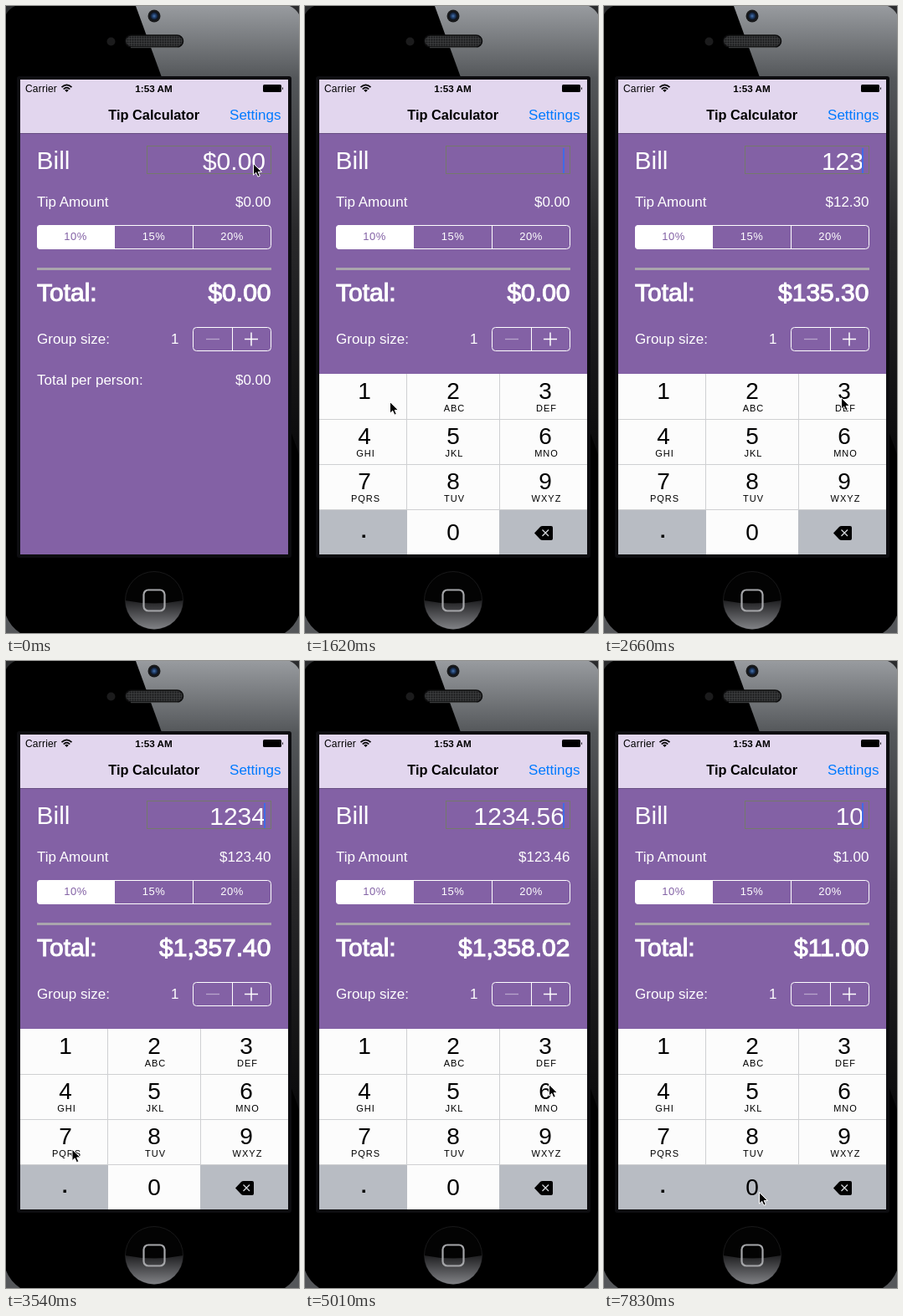
These frames come from a looping animation (350 px wide and 750 px high, 8 s). An HTML page:

```html
<!DOCTYPE html>
<html lang="en">
<head>
<meta charset="utf-8">
<title>Tip Calculator</title>
<style>
html, body { margin: 0; width: 100%; height: 100%; overflow: hidden; background: #000; }
svg { display: block; width: 350px; height: 750px; font-family: "Liberation Sans", Arial, sans-serif; }
.w { fill: #fff; }
.body { font-size: 17px; }
.big { font-size: 30px; }
.medium { stroke: #fff; stroke-width: 1.1px; }
.mid { text-anchor: middle; }
.end { text-anchor: end; }
.outline { fill: none; stroke: #fff; }
.seg { font-size: 13px; letter-spacing: .5px; text-anchor: middle; }
.digit { font-size: 28px; text-anchor: middle; }
.abc { font-size: 11px; letter-spacing: 1px; text-anchor: middle; }
</style>
</head>
<body>
<svg viewBox="0 0 350 750">
  <defs>
    <linearGradient id="gloss" gradientUnits="userSpaceOnUse" x1="0" y1="0" x2="0" y2="536">
      <stop offset="0" stop-color="#989b9f"/>
      <stop offset=".16" stop-color="#54575a"/>
      <stop offset=".5" stop-color="#29292b"/>
      <stop offset="1" stop-color="#0a0a0b"/>
    </linearGradient>
    <linearGradient id="shine" x1="0" y1="0" x2="0" y2="1">
      <stop offset="0" stop-color="#202022"/>
      <stop offset="1" stop-color="#85868a"/>
    </linearGradient>
    <radialGradient id="lens">
      <stop offset="0" stop-color="#4a76b0"/>
      <stop offset=".45" stop-color="#22406c"/>
      <stop offset="1" stop-color="#0b0f18"/>
    </radialGradient>
    <pattern id="mesh" width="3" height="3" patternUnits="userSpaceOnUse">
      <rect width="3" height="3" fill="#38393b"/>
      <circle cx="1.5" cy="1.5" r="1" fill="#161617"/>
    </pattern>
    <clipPath id="screen"><rect x="17" y="88" width="320" height="568"/></clipPath>
    <clipPath id="home"><circle cx="177" cy="711" r="34.5"/></clipPath>
  </defs>

  <!-- phone -->
  <rect width="350" height="750"/>
  <path d="M155 0H350V536Z" fill="url(#gloss)"/>
  <path d="M0 10Q4 3 11 0H0ZM350 10Q346 3 339 0H350Z" fill="#2b2c2e"/>
  <path d="M0 729Q5 742 17 750H0ZM350 729Q345 742 333 750H350Z" fill="#55575a"/>
  <circle cx="177" cy="12" r="7.5" fill="#17181a"/>
  <circle cx="177" cy="12" r="5" fill="url(#lens)"/>
  <circle cx="125.500" cy="42.500" r="5" fill="#1b1b1c"/>
  <rect x="142.500" y="35" width="69" height="14" rx="7" fill="url(#mesh)" stroke="#0c0c0d" stroke-width="1.500"/>
  <path d="M149 49.700H205" stroke="#606265" stroke-width=".7"/>
  <rect x="13" y="84" width="328" height="576" rx="3" fill="#0d0d10"/>
  <circle cx="177" cy="711" r="34.500" fill="#030303" stroke="#19191a"/>
  <path d="M142 711Q177 718 212 711V747H142Z" fill="url(#shine)" clip-path="url(#home)"/>
  <rect x="164.500" y="698.500" width="25" height="25" rx="5.500" fill="none" stroke="#a5a6a9" stroke-width="2.200"/>

  <g clip-path="url(#screen)">
    <rect x="17" y="88" width="320" height="568" fill="#8361a5"/>
    <rect x="17" y="88" width="320" height="64" fill="#e2d6ee"/>
    <path d="M17 152.500H337" stroke="#674d82"/>

    <!-- status and title -->
    <g font-size="12">
      <text x="23" y="102.500" letter-spacing=".2">Carrier</text>
      <text class="mid" x="176.500" y="102.500" font-size="11.700" font-weight="bold">1:53 AM</text>
    </g>
    <g fill="none" stroke="#000" stroke-width="1.700">
      <path d="M66.500 97.200Q72.500 91.400 78.500 97.200M68.700 99.500Q72.500 95.700 76.300 99.500"/>
      <path d="M70.200 100.800Q72.500 98.900 74.800 100.800L72.500 103Z" fill="#000" stroke="none"/>
    </g>
    <rect x="307" y="94" width="22" height="9" rx="1.500"/>
    <path d="M330 97Q332 98.500 330 100.500Z"/>
    <text class="mid" x="176.700" y="136" font-size="16.400" font-weight="bold">Tip Calculator</text>
    <text class="body end" x="328.500" y="136" fill="#007aff">Settings</text>

    <!-- form -->
    <g class="w body">
      <text class="big" x="36.500" y="195">Bill</text>
      <text x="37" y="240">Tip Amount</text>
      <text class="big medium" x="37" y="353">Total:</text>
      <text x="37" y="404">Group size:</text>
      <text class="end" x="206.500" y="404">1</text>
      <text x="37" y="453">Total per person:</text>
      <text class="end" id="tip" x="316.500" y="240"></text>
      <text class="big medium end" id="total" x="316.500" y="353"></text>
      <text class="end" id="each" x="316.500" y="453"></text>
    </g>
    <rect x="168.500" y="167.500" width="148" height="33" fill="none" stroke="#74796b"/>
    <text class="w big end" id="bill" x="310" y="195.500"></text>
    <rect id="caret" x="308" y="170" width="2" height="30" fill="#416ae6"/>

    <rect x="37" y="262" width="93" height="29" rx="4" class="w"/>
    <rect x="37.500" y="262.500" width="279" height="28" rx="4" class="outline"/>
    <path d="M129.500 262V291M223.500 262V291" class="outline"/>
    <text class="seg" x="83" y="280" fill="#8361a5">10%</text>
    <text class="seg w" x="176.500" y="280">15%</text>
    <text class="seg w" x="270" y="280">20%</text>
    <rect x="37" y="313" width="280" height="3" fill="#aaa5ad"/>

    <rect x="223.500" y="384.500" width="93" height="28" rx="4" class="outline"/>
    <path d="M270.500 384V413" class="outline"/>
    <path d="M239 398.500H255" stroke="#b7a4cb" stroke-width="1.300"/>
    <path d="M285 398.500H301M293 390.500V406.500" stroke="#fff" stroke-width="1.500"/>

    <g id="pad"></g>
  </g>

  <path id="mouse" d="M.5 .6V14.200L3.700 11.200L5.900 16.200L8.300 15.200L6.200 10.400H10.400Z" stroke="#fff" stroke-width="1"/>
</svg>

<script>
const LOOP = 8000, STEP = 147.6;
const WHITE = '#fcfcfc', GREY = '#b8bcc3';
const $ = id => document.getElementById(id);

// All tables below count in screen refreshes of STEP ms.
const mousePath = [
  [0, 295, 188], [1, 300, 191], [4, 300, 191], [6, 255, 262], [10, 112, 468],
  [11, 101, 473], [12, 90, 470], [13, 90, 470], [15, 182, 470], [16, 186, 470],
  [17, 278, 468], [18, 283, 468], [19, 270, 473], [22, 84, 524], [23, 82, 526],
  [25, 75, 641], [26, 75, 641], [27, 82, 630], [29, 163, 541], [30, 167, 537],
  [31, 172, 535], [33, 288, 507], [34, 291, 506], [39, 291, 506], [42, 259, 631],
  [50, 257, 631], [52, 187, 635], [53, 185, 635]
];
const bills = [
  [0, '$0.00'], [3, ''], [13, '1'], [16, '12'], [18, '123'], [23, '1234'],
  [26, '1234.'], [31, '1234.5'], [34, '1234.56'], [43, '1234.5'], [45, '1234.'],
  [47, '1234'], [48, '123'], [49, '12'], [50, '1'], [53, '10']
];
const presses = [
  [12, '1'], [15, '2'], [17, '3'], [22, '4'], [25, '.'], [30, '5'], [33, '6'],
  [42, 'del'], [44, 'del'], [46, 'del'], [48, 'del'], [52, '0'], [53, '0'], [54, '0']
];
const SLIDE_FROM = 3, SLIDE_STEPS = 3, CARET_OFF = 37;

const cols = [[17, 105, 71], [122, 110, 177], [232, 105, 287]];
const names = ['1', '2', '3', '4', '5', '6', '7', '8', '9', '.', '0', 'del'];
const letters = ['', 'ABC', 'DEF', 'GHI', 'JKL', 'MNO', 'PQRS', 'TUV', 'WXYZ'];
const keys = {};

function buildPad() {
  let html = '';
  names.forEach((name, i) => {
    const [x, w, mid] = cols[i % 3], y = 440 + 54 * Math.floor(i / 3);
    html += `<rect data-key="${name}" x="${x}" y="${y}" width="${w}" height="54"/>`;
    if (name === 'del') {
      html += `<path d="M274 630.500L281 623Q282 622 284 622H294Q296 622 296 624V637Q296 639 294 639H284Q282 639 281 638Z"/>
        <path d="M283.500 626.500L291 634M291 626.500L283.500 634" stroke="#d5d8dc" stroke-width="1.300"/>`;
    } else if (name === '.') {
      html += `<rect x="68.500" y="632.500" width="3.500" height="3.500"/>`;
    } else {
      html += `<text class="digit" x="${mid}" y="${y + (name === '0' ? 37 : 30)}">${name}</text>`;
    }
    if (letters[i]) html += `<text class="abc" x="${mid + 1.5}" y="${y + 45}">${letters[i]}</text>`;
  });
  html += `<path d="M17 494.500H337M17 548.500H337M17 602.500H337M121.500 440V602M232.500 440V602"
    stroke="#cfd0d2" fill="none"/>`;
  $('pad').innerHTML = html;
  document.querySelectorAll('[data-key]').forEach(el => keys[el.dataset.key] = el);
}

function mouseAt(k) {
  const i = mousePath.findIndex(p => p[0] > k);
  if (i < 0) return mousePath[mousePath.length - 1].slice(1);
  const [k0, x0, y0] = mousePath[i - 1], [k1, x1, y1] = mousePath[i];
  const p = (k - k0) / (k1 - k0);
  return [x0 + (x1 - x0) * p, y0 + (y1 - y0) * p];
}

const money = n => '$' + n.toLocaleString('en-US', { minimumFractionDigits: 2, maximumFractionDigits: 2 });

function draw(k) {
  const bill = bills.filter(b => b[0] <= k).pop()[1];
  const amount = parseFloat(bill) || 0;
  $('bill').textContent = bill;
  $('tip').textContent = money(amount * 0.1);
  $('total').textContent = $('each').textContent = money(amount * 1.1);
  $('caret').style.display = k < SLIDE_FROM || k === CARET_OFF ? 'none' : '';

  const p = Math.min(1, Math.max(0, (k - SLIDE_FROM) / SLIDE_STEPS));
  $('pad').setAttribute('transform', `translate(0 ${216 * (1 - p) ** 3})`);

  const down = presses.find(q => q[0] === k);
  for (const name in keys) {
    const dark = (name === '.' || name === 'del') !== (!!down && down[1] === name);
    keys[name].setAttribute('fill', dark ? GREY : WHITE);
  }
  $('mouse').setAttribute('transform', `translate(${mouseAt(k)})`);
}

function tick() {
  const t = performance.now() % LOOP;
  draw(Math.floor((t + 10) / STEP));
  requestAnimationFrame(tick);
}

buildPad();
tick();
</script>
</body>
</html>
```
